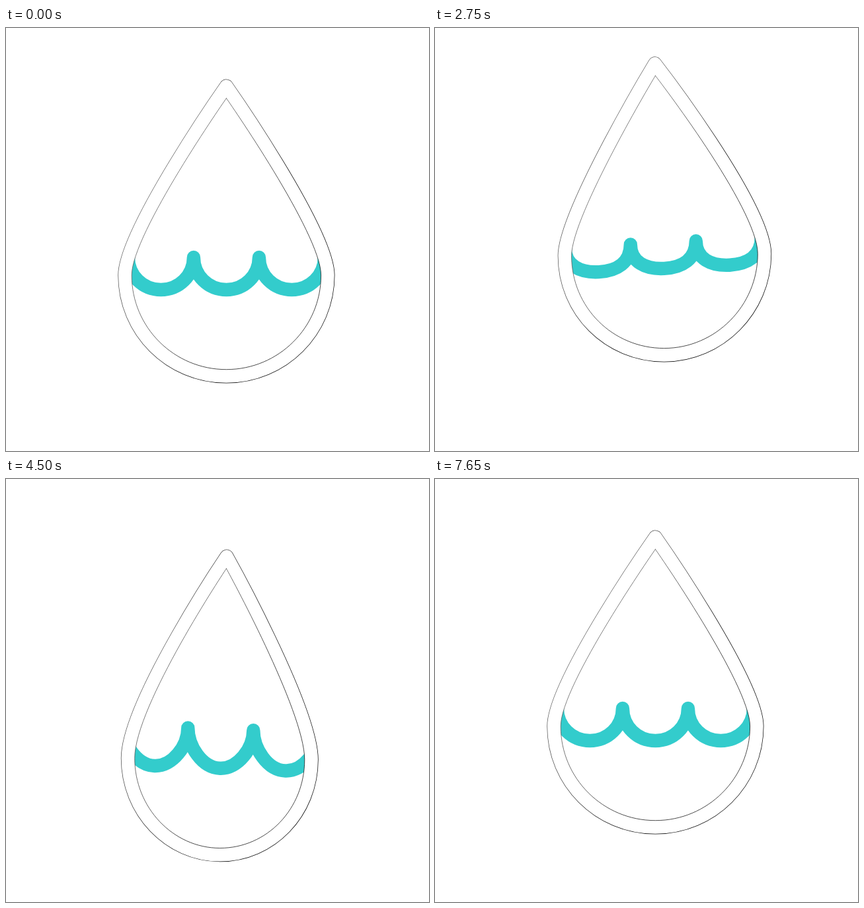
Animation of 640x640 px, one loop 7750 ms. Source, as an HTML page with a canvas:

```html
<!DOCTYPE html>
<html lang="en">
<head>
<meta charset="utf-8">
<title>Swinging drop</title>
<style>
  html, body { margin: 0; width: 100%; height: 100%; overflow: hidden; background: #fff; }
  canvas { display: block; width: 640px; height: 640px; }
</style>
</head>
<body>
<canvas id="stage" width="640" height="640"></canvas>
<script>
const ctx = document.getElementById('stage').getContext('2d');
const LOOP = 7750, STEP = 50;
const MID = 333.4, PITCH = 99, K = 0.5523;
const HALF = 10.3, POINT = 18.3; // ring half width, depth of its inner point
const REST = { rx: 153.5, height: 439 };

const sine = u => (1 - Math.cos(Math.PI * u)) / 2;
const steep = u => u * u * u * (u * (6 * u - 15) + 10);

// Eased track through [time, value] turning points
const track = (ease, ...keys) => t => {
  const i = keys.findIndex(k => k[0] > t);
  if (i < 0) return keys[keys.length - 1][1];
  const [t0, a] = keys[i - 1], [t1, b] = keys[i];
  return a + (b - a) * ease((t - t0) / (t1 - t0));
};

const swingAt = track(steep, [0, 0], [1600, -20.5], [3350, 24], [5100, -20], [6400, 9.3], [7400, 0]);
const tipAt = track(sine, [0, 88], [850, 107], [2520, 51], [4270, 119.5], [5600, 88]);
const bottomAt = track(sine, [0, 527], [850, 559], [2520, 491.5], [4270, 572], [5600, 527]);
const ampAt = track(sine, [0, 49], [950, 61], [2800, 39], [4300, 60], [6300, 38], [7600, 49]);

// The drop narrows as it stretches; inset moves the outline inwards
function dropPath({ swing, tip, bottom, squash }, inset, point, tipX) {
  const p = new Path2D();
  const rx = REST.rx - squash - inset;
  const ry = 153 - 0.53 * squash - inset;
  const low = bottom - inset, top = tip + point;
  const cx = MID + swing, cy = low - ry, lowX = MID + 0.95 * swing;
  const left = cx - rx, right = cx + rx;
  const leftY = cy + 0.1 * swing, rightY = cy - 0.1 * swing;
  const lift = 0.235 * (cy - top) + 0.6 * squash, lean = 0.3 * swing;
  p.moveTo(tipX, top);
  p.bezierCurveTo(tipX, top, right, rightY - lift - lean, right, rightY);
  p.bezierCurveTo(right, rightY + K * ry, lowX + K * rx, low, lowX, low);
  p.bezierCurveTo(lowX - K * rx, low, left, leftY + K * ry, left, leftY);
  p.bezierCurveTo(left, leftY - lift + lean, tipX, top, tipX, top);
  p.closePath();
  return p;
}

function wavePath({ swing, bottom, amp }) {
  const p = new Path2D();
  const low = bottom - 131, tilt = -0.37 * swing / PITCH;
  const crest = n => [MID + 0.85 * swing + n * PITCH, low - amp + tilt * n * PITCH];
  const trough = n => [MID + 0.95 * swing + n * PITCH, low + tilt * n * PITCH];
  const reach = K * PITCH / 2, lean = reach * tilt;
  p.moveTo(...crest(-2.5));
  for (let n = -2; n <= 2; n++) {
    const [ax, ay] = crest(n - 0.5), [bx, by] = crest(n + 0.5), [x, y] = trough(n);
    p.bezierCurveTo(ax, ay + reach, x - reach, y - lean, x, y);
    p.bezierCurveTo(x + reach, y + lean, bx, by + reach, bx, by);
  }
  return p;
}

function stroke(path, width, style) {
  ctx.lineWidth = width;
  ctx.strokeStyle = style;
  ctx.stroke(path);
}

const edge = ctx.createLinearGradient(230, 230, 390, 310);
edge.addColorStop(0, '#606060');
edge.addColorStop(1, '#101010');

function draw(t) {
  const pose = { swing: swingAt(t), tip: tipAt(t), bottom: bottomAt(t), amp: ampAt(t) };
  pose.squash = 1.17 * (pose.bottom - pose.tip - REST.height);
  const ring = dropPath(pose, 0, 0, MID - 0.05 * pose.swing);
  const inner = dropPath(pose, HALF, POINT, MID);

  ctx.fillStyle = '#fff';
  ctx.fillRect(0, 0, 640, 640);
  ctx.lineCap = ctx.lineJoin = 'round';
  stroke(ring, 2 * HALF + 0.6, edge);
  ctx.fill(ring);
  stroke(ring, 2 * HALF - 0.9, '#fff');

  ctx.save();
  ctx.clip(inner);
  ctx.fillRect(0, 0, 640, 640);
  stroke(wavePath(pose), 20.4, '#33cccc');
  ctx.restore();
  stroke(inner, 0.75, edge);
}

const start = performance.now();
function tick() {
  const t = (performance.now() - start) % LOOP;
  draw(Math.floor(t / STEP) * STEP);
  requestAnimationFrame(tick);
}
tick();
</script>
</body>
</html>
```
